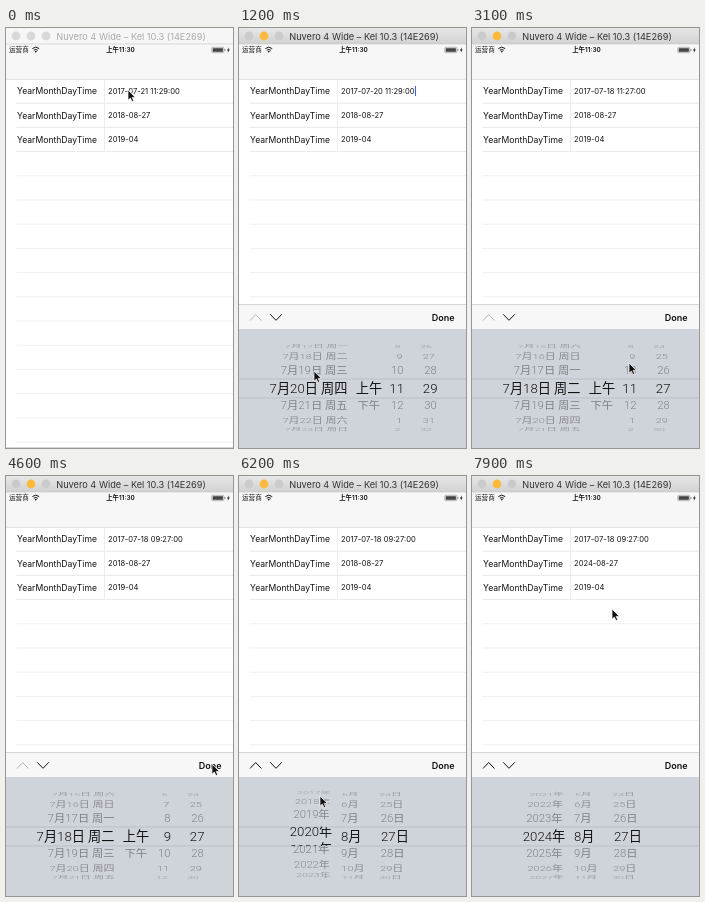
These frames come from a looping animation (227x420 px, 8000 ms). An HTML page:

```html
<!DOCTYPE html>
<html lang="zh-CN">
<head>
<meta charset="utf-8">
<style>
html, body { margin: 0; width: 100%; height: 100%; overflow: hidden; background: #fff; }
svg { display: block; width: 227px; height: 420px; }
text { font-family: Inter, "Noto Sans CJK SC", "Noto Sans CJK", sans-serif; fill: #111; white-space: pre; }
#wheels text { font-family: Roboto, "Noto Sans CJK SC", "Noto Sans CJK", sans-serif; font-weight: 300; }
</style>
</head>
<body>
<svg viewBox="0 0 227 420" xmlns="http://www.w3.org/2000/svg">
  <defs>
    <linearGradient id="bar" x2="0" y2="1">
      <stop stop-color="#e6e6e6"/><stop offset="1" stop-color="#d2d2d2"/>
    </linearGradient>
    <clipPath id="band"><rect y="351" width="227" height="19"/></clipPath>
    <clipPath id="around"><path d="M0 302H227V351H0zM0 370H227V420H0z"/></clipPath>
  </defs>
  <rect width="227" height="420" fill="#fff"/>
  <rect y="16" width="227" height="35" fill="#f7f7f7"/>
  <g id="list"></g>
  <g id="status">
    <text x="3" y="24.3" font-size="6.6">运营商</text>
    <path d="M26.4 20.6Q29.8 17.6 33.2 20.6M27.8 22.3Q29.8 20.5 31.8 22.3" fill="none" stroke="#111"/>
    <path d="M28.7 23.3Q29.8 22.4 30.9 23.3L29.8 24.8z" fill="#111"/>
    <text x="114.5" y="24.3" font-size="6.4" font-weight="600" text-anchor="middle">上午11:30</text>
    <rect x="205.8" y="19.3" width="12" height="5.4" rx="1" fill="none" stroke="#888" stroke-width=".6"/>
    <rect x="206.7" y="20.2" width="10.2" height="3.6" fill="#444"/>
    <rect x="218.4" y="21" width="1" height="2" fill="#888"/>
    <path d="M223 19.2L220.9 22.4H222.2L221.6 25L223.8 21.5H222.5z" fill="#222"/>
  </g>
  <g id="keys">
    <rect y="277" width="227" height="25" fill="#f7f7f7"/>
    <path d="M0 276.5H227" stroke="#c4c4c6" stroke-width=".7"/>
    <rect y="301" width="227" height="119" fill="#cfd3da"/>
    <g fill="none">
      <path id="up" d="M11 292.5L16.7 286.5L22.4 292.5"/>
      <path d="M31.2 286.3L37 292.3L42.8 286.3" stroke="#111"/>
    </g>
    <text x="215.5" y="292.6" font-size="9" font-weight="600" text-anchor="end">Done</text>
    <path d="M0 351H227M0 370H227" stroke="#b4b8bf" stroke-width=".7"/>
    <g id="wheels"></g>
  </g>
  <rect id="titlebar" width="227" height="16"/>
  <path d="M0 16H227" stroke="#c4c4c4" stroke-width=".6"/>
  <g id="lights"></g>
  <text id="title" x="125" y="11.6" font-size="9.2" text-anchor="middle">Nuvero 4 Wide – Kel 10.3 (14E269)</text>
  <g id="pointer">
    <path d="M0 0V11.6L2.7 9.2L4.5 13.2L6.5 12.3L4.7 8.4H8.3z" transform="scale(.88)" fill="#111" stroke="#fff" stroke-width=".8"/>
  </g>
</svg>
<script>
const LOOP = 8000, DRAG = 300, SPIN = 600, SLIDE = 480;
const OPEN = 110, CLOSE = 4650, REOPEN = 5110;
const $ = id => document.getElementById(id);
const set = (el, attrs) => { for (const k in attrs) el.setAttribute(k, attrs[k]); return el; };
const add = (parent, tag, attrs = {}) =>
  parent.appendChild(set(document.createElementNS("http://www.w3.org/2000/svg", tag), attrs));

const easeOut = (t, start, length, power) =>
  1 - (1 - Math.min(1, Math.max(0, (t - start) / length))) ** power;
const wrap = (n, size) => ((n - 1) % size + size) % size + 1;
const pad = n => String(n).padStart(2, "0");

// Every press of the pointer; one with a wheel drags it by some rows.
const presses = [
  { at: 100, x: 122, y: 62 },
  { at: 600, x: 75, y: 328, wheel: "date", rows: -1 },
  { at: 1250, x: 75, y: 343, wheel: "date", rows: -2 },
  { at: 2000, x: 190, y: 335, wheel: "minute", rows: -2 },
  { at: 3200, x: 157, y: 335, wheel: "hour", rows: -2 },
  { at: 4500, x: 206, y: 288 },
  { at: 5100, x: 154, y: 87 },
  { at: 5900, x: 81, y: 365, wheel: "year", rows: 3 },
  { at: 6700, x: 81, y: 365, wheel: "year", rows: 3 },
  { at: 7900, x: 140, y: 133 }
];
const drags = presses.filter(p => p.wheel);

// The pointer rests briefly before a press and follows the drag by 15 px a row.
const stops = presses.flatMap(({ at, x, y, rows = 0 }) => [
  { t: at - 100, x, y }, { t: at, x, y }, { t: at + DRAG, x, y: y - rows * 15 }
]);
function pointerAt(t) {
  const i = Math.max(1, stops.findIndex(s => s.t > t)), a = stops[i - 1], b = stops[i];
  const p = (t - a.t) / (b.t - a.t), e = p * p * (3 - 2 * p);
  return `${a.x + (b.x - a.x) * e} ${a.y + (b.y - a.y) * e}`;
}

const dateRow = n => `7月${n}日 周${"日一二三四五六"[(n + 5) % 7]}`;
const wheels = {
  date: { picker: 0, anchor: "end", x: 108.5, first: 21, label: dateRow },
  half: { picker: 0, anchor: "middle", x: 130, first: 0, label: n => ["上午", "下午"][n] || "" },
  hour: { picker: 0, anchor: "end", x: 165, first: 11, label: n => wrap(n, 12) },
  minute: { picker: 0, anchor: "end", x: 198.5, first: 29, label: n => n % 60 },
  year: { picker: 1, anchor: "middle", x: 72, first: 2018, label: n => n + "年" },
  month: { picker: 1, anchor: "start", x: 102, first: 8, label: n => wrap(n, 12) + "月" },
  day: { picker: 1, anchor: "start", x: 142, first: 27, label: n => wrap(n, 31) + "日" }
};
const position = (name, t) => drags.filter(d => d.wheel === name)
  .reduce((sum, d) => sum + d.rows * easeOut(t, d.at, SPIN, 2), wheels[name].first);
const settled = (name, t) => drags.filter(d => d.wheel === name && d.at + SPIN <= t)
  .reduce((sum, d) => sum + d.rows, wheels[name].first);

const fields = [
  t => `2017-07-${settled("date", t)} ${pad(settled("hour", t))}:${settled("minute", t)}:00`,
  t => settled("year", t) + "-08-27",
  () => "2019-04"
];

// The caret blinks from the latest focus or change and hides while a wheel turns.
function caretShown(t) {
  if (t < OPEN || (t >= CLOSE && t < REOPEN - 10)) return false;
  if (drags.some(d => t >= d.at && t < d.at + SPIN)) return false;
  const since = [OPEN, REOPEN - 10, ...drags.map(d => d.at + SPIN)].filter(s => s <= t);
  return (t - Math.max(...since)) % 1000 < 400;
}

// List
const PITCH = 24.2, TOP = 51;
const line = (d, stroke) => add($("list"), "path", { d, stroke, "stroke-width": .7 });
for (let i = 1; i < 16; i++)
  line(`M10.5 ${TOP + i * PITCH}H227`, i < 4 ? "#dedee0" : "#eaeaec");
line("M0 51.3H227", "#d2d2d4");
const inputs = fields.map((_, i) => {
  const y = TOP + i * PITCH;
  add($("list"), "text", { x: 11, y: y + 15.3, "font-size": 8.6 }).textContent = "YearMonthDayTime";
  line(`M98.5 ${y + .5}V${y + PITCH}`, "#e6e6e8");
  return add($("list"), "text", { x: 102, y: y + 14.9, "font-size": 7.6 });
});
const caret = add($("list"), "rect", { width: 1, height: 10, fill: "#3c5fd8" });
const lights = [10, 25, 40].map(cx => add($("lights"), "circle", { cx, cy: 8, r: 4.4 }));

// Wheels: a curved drum, and a flat enlarged lens inside the middle band
const MID = 360, CX = 113, RADIUS = 44.5, ANGLE = .4;
const rowsFor = (group, anchor, x, size, count) => Array.from({ length: count }, () =>
  add(group, "text", { "text-anchor": anchor, x, y: size * .36, "font-size": size }));
const pickers = [0, 1].map(() => {
  const g = add($("wheels"), "g");
  return { g, drum: add(g, "g", { "clip-path": "url(#around)" }), lens: add(g, "g", { "clip-path": "url(#band)" }) };
});
for (const w of Object.values(wheels)) {
  w.drum = rowsFor(pickers[w.picker].drum, w.anchor, w.x - CX, 11.4, 7);
  w.lens = rowsFor(pickers[w.picker].lens, w.anchor, w.x, 13.2, 3);
}

function turn(name, t) {
  const { label, drum, lens } = wheels[name];
  const at = position(name, t), near = Math.round(at);
  drum.forEach((row, i) => {
    const n = near + i - 3, a = (n - at) * ANGLE, c = Math.cos(a);
    row.textContent = label(n);
    set(row, {
      transform: `translate(${CX} ${MID + RADIUS * Math.sin(a)}) scale(${.9 + .1 * c} ${c})`,
      opacity: .2 + .24 * c
    });
  });
  lens.forEach((row, i) => {
    const n = near + i - 1;
    row.textContent = label(n);
    set(row, { transform: `translate(0 ${MID + (n - at) * 18})` });
  });
}

function draw(t) {
  const active = t >= 100, focus = t < REOPEN - 10 ? 0 : 1;
  set($("titlebar"), { fill: active ? "url(#bar)" : "#f6f6f6" });
  $("title").style.fill = active ? "#333" : "#aaa";
  lights.forEach((el, i) => set(el, { fill: !active ? "#d8d8d8" : i === 1 ? "#fdb93c" : "#cbcbcb" }));

  inputs.forEach((el, i) => { el.textContent = fields[i](t); });
  set(caret, {
    x: 102.5 + inputs[focus].getComputedTextLength(),
    y: 58 + focus * PITCH,
    opacity: caretShown(t) ? 1 : 0
  });

  const [opened, closed, reopened] = [OPEN, CLOSE, REOPEN].map(s => easeOut(t, s, SLIDE, 3));
  set($("keys"), { transform: `translate(0 ${143 * (1 - opened + closed - reopened)})` });
  set($("up"), { stroke: focus ? "#111" : "#b4b4b6" });
  pickers.forEach((p, i) => set(p.g, { display: i === focus ? "inline" : "none" }));
  for (const name in wheels) turn(name, t);
  set($("pointer"), { transform: `translate(${pointerAt(t)})` });
}

const start = performance.now();
function tick() {
  draw((performance.now() - start) % LOOP);
  requestAnimationFrame(tick);
}
draw(0);
requestAnimationFrame(tick);
</script>
</body>
</html>
```
